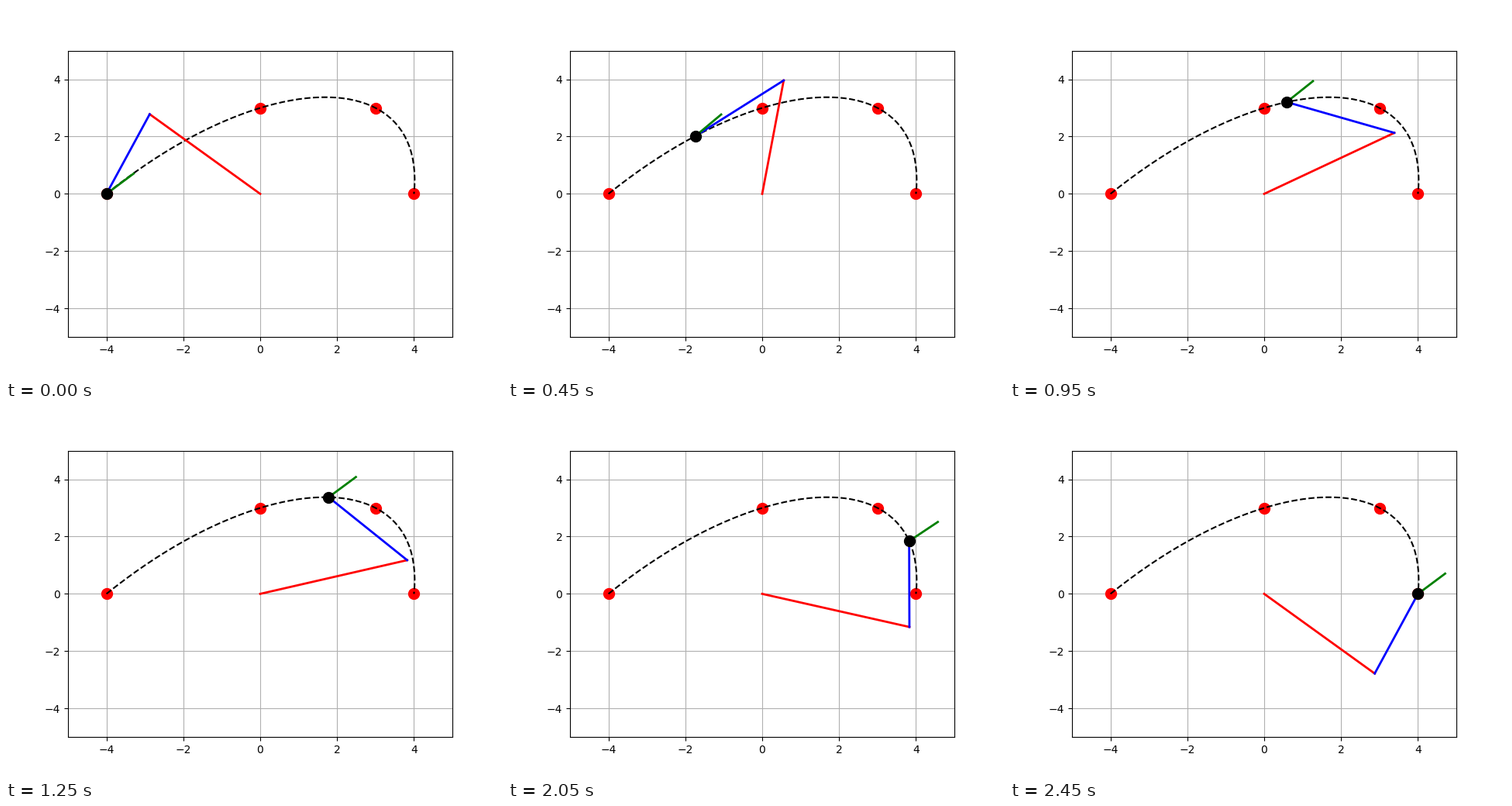
Write a matplotlib script that moves like this. It is 640 by 480 pixels and loops after 2500 ms.

```python
import numpy as np
import matplotlib.pyplot as plt
from matplotlib.animation import FuncAnimation

FRAMES = 50
INTERVAL = 50
L1, L2, L3 = 4.0, 3.0, 1.0
WAYPOINTS = np.array([[-4, 0], [0, 3], [3, 3], [4, 0]], dtype=float)
TILT = np.radians([45, 47.6, 42.4, 45])

# A single cubic through four evenly spaced knots
knots = np.arange(4)
t = np.linspace(0, 3, FRAMES)


def cubic(values):
    return np.polyval(np.polyfit(knots, values, 3), t)


path_x = cubic(WAYPOINTS[:, 0])
path_y = cubic(WAYPOINTS[:, 1])
tilt = cubic(TILT)


def solve_arm(x, y, angle):
    """Return shoulder, elbow, wrist and tip for a wrist at (x, y)."""
    r = np.hypot(x, y)
    bend = np.arccos(np.clip((L1**2 + r**2 - L2**2) / (2 * L1 * r), -1, 1))
    shoulder = np.arctan2(y, x) - bend
    elbow = (L1 * np.cos(shoulder), L1 * np.sin(shoulder))
    tip = (x + L3 * np.cos(angle), y + L3 * np.sin(angle))
    return [(0, 0), elbow, (x, y), tip]


fig, ax = plt.subplots(figsize=(6.4, 4.8), dpi=100)
ax.set_xlim(-5, 5)
ax.set_ylim(-5, 5)
ax.grid(True)

ax.plot(WAYPOINTS[:, 0], WAYPOINTS[:, 1], "ro", markersize=10)
ax.plot(path_x, path_y, "k--")
links = [ax.plot([], [], color=c, lw=2)[0] for c in ("red", "blue", "green")]
wrist, = ax.plot([], [], "ko", markersize=10)


def update(i):
    joints = solve_arm(path_x[i], path_y[i], tilt[i])
    for link, start, end in zip(links, joints, joints[1:]):
        link.set_data([start[0], end[0]], [start[1], end[1]])
    wrist.set_data([path_x[i]], [path_y[i]])
    return links + [wrist]


anim = FuncAnimation(fig, update, frames=FRAMES, interval=INTERVAL,
                     repeat=True, repeat_delay=0, blit=False)
plt.show()
```
